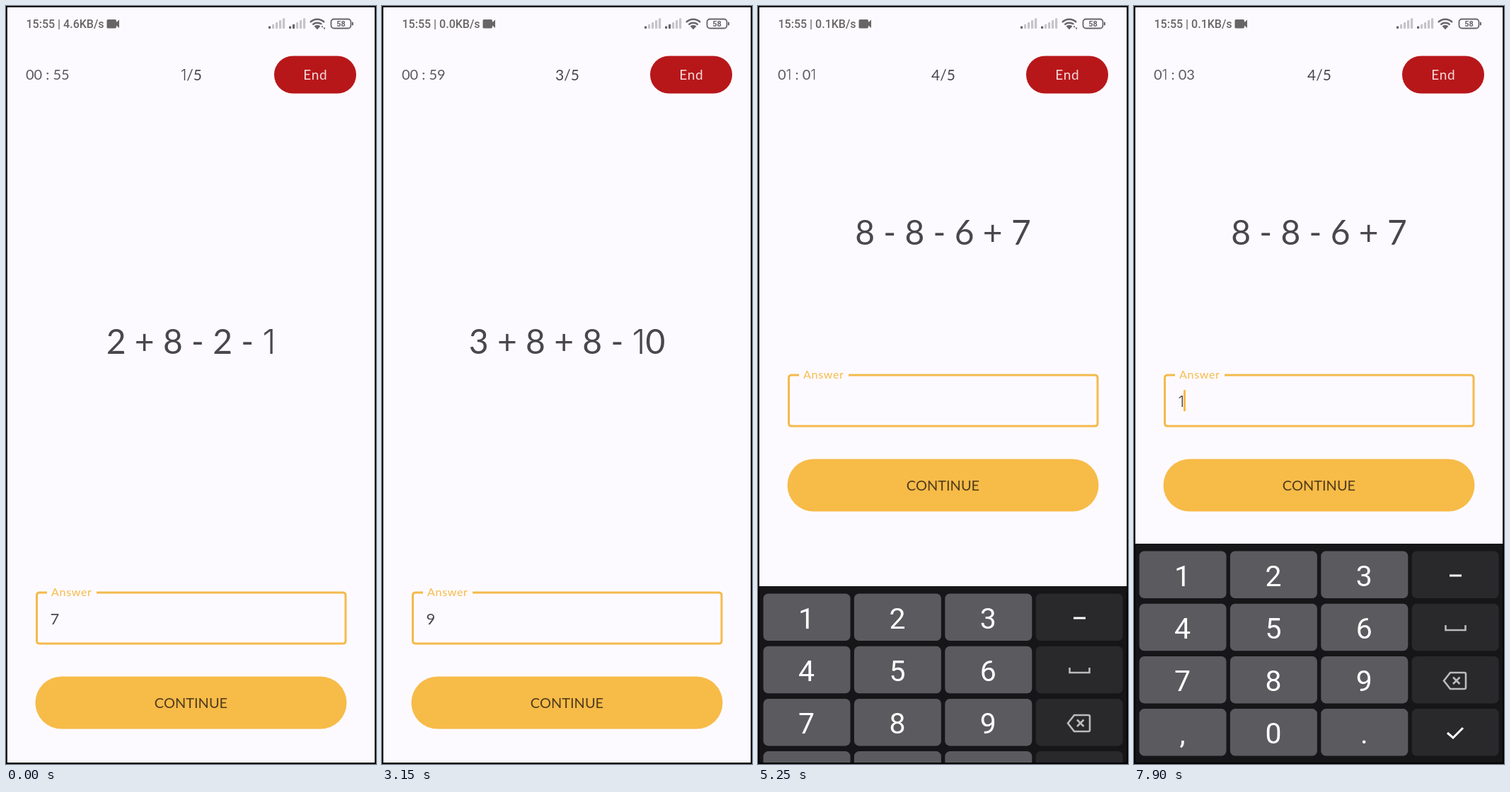
Animation, 523 px wide and 1070 px high, one loop 8 s. Source, as an HTML page:

```html
<!DOCTYPE html>
<html lang="en">
<head>
<meta charset="utf-8">
<title>Arithmetic quiz</title>
<style>
html, body { margin: 0; width: 100%; height: 100%; overflow: hidden; background: #fdfaff; }
svg { display: block; width: 523px; height: 1070px; font: 20px Lato, "Open Sans", sans-serif; fill: #48474c; }
.one { font-family: Inter, sans-serif; font-weight: 300; }
.mid { text-anchor: middle; }
.status { font: 500 16px Roboto, sans-serif; fill: #666; }
.key { font: 41px Roboto, sans-serif; fill: #fff; text-anchor: middle; }
.line { fill: none; stroke: #66656a; stroke-width: 2.4; }
.gold { fill: #f7bb48; }
</style>
</head>
<body>
<svg viewBox="0 0 523 1070">
  <rect width="523" height="1070" fill="#fdfaff"/>

  <text class="status" id="status" x="28.5" y="31"></text>
  <path d="M144 19h10q2 0 2 2v2l4-3.500v11.500l-4-3.500v2q0 2-2 2h-10q-1.500 0-1.500-1.500v-9q0-2 1.500-2z" fill="#666"/>
  <g id="bars"></g>
  <path class="line" d="M430 23a14 14 0 0 1 20 0M433.500 26.500a9 9 0 0 1 13 0"/>
  <path d="M435.500 28.500q4.500-3.500 9 0l-4.500 4.800z" fill="#66656a"/>
  <path id="arrows" d="M444.500 26h7v8h-7z" fill="#fdfaff"/>
  <path id="arrowTips" d="M445.500 30l1.500-2.500 1.500 2.500zM448.500 30.500h3l-1.500 3z" fill="#66656a"/>
  <rect class="line" x="459.500" y="18.500" width="28" height="13" rx="4" style="stroke-width:1.800"/>
  <rect x="489" y="22.500" width="2" height="5" rx="1" fill="#66656a"/>
  <text class="mid" x="473.500" y="29" style="font:700 11px Roboto,sans-serif" fill="#66656a">58</text>

  <text id="timer" x="28" y="104" fill="#5a595e"></text>
  <text id="counter" class="mid" x="262" y="104.500" font-size="21"></text>
  <rect x="379" y="70.500" width="116" height="53" rx="26.500" fill="#b8171a"/>
  <text class="mid" x="437.300" y="103.500" font-size="19" letter-spacing=".7" fill="#f6dcdc">End</text>

  <g id="pages" class="mid" font-size="48"></g>

  <g id="form">
    <path d="M58 828H47.500q-4 0-4 4V896q0 4 4 4H476q4 0 4-4V832q0-4-4-4H128" fill="none" stroke="#f4ba4c" stroke-width="3"/>
    <text class="gold" x="64" y="833" font-size="16" letter-spacing=".7">Answer</text>
    <text id="answer" x="62.500" y="873" font-size="22"></text>
    <rect id="cursor" class="gold" y="849" width="3" height="30"/>
    <rect class="gold" x="41.500" y="946.500" width="440" height="74" rx="37"/>
    <text class="mid" x="261.500" y="991" fill="#4f3c1b">CONTINUE</text>
  </g>

  <g id="keyboard"><rect y="759" width="523" height="311" fill="#161518"/></g>
  <path d="M.8 .8H522.200V1069H.8z" fill="none" stroke="#000" stroke-width="2"/>
</svg>
<script>
const $ = id => document.getElementById(id);
const LOOP = 8000, PAGE = 520, SLIDE = 500;
const questions = ['2 + 8 - 2 - 1', '2 - 10 + 10 - 8', '3 + 8 + 8 - 10', '8 - 8 - 6 + 7'];
const answers = ['7', '-6', '9', ''];
const slides = [500, 2177, 3820];
const ticks = [100, 1150, 2150, 3050, 4100, 5150, 6050, 7150];
// Times at which the caret turns on, off, on, ...
const blinks = [1000, 1500, 2000, 3100, 3650, 4800, 5350, 5850, 6350, 6800, 7300];

const passed = (times, t) => times.filter(x => t >= x).length;
const set = (id, attr, value) => $(id).setAttribute(attr, value);
const show = (id, on) => set(id, 'visibility', on ? 'visible' : 'hidden');
const footless = s => s.replace(/1/g, '<tspan class="one">1</tspan>');
const write = (id, s) => { if ($(id).textContent !== s) $(id).innerHTML = footless(s); };

// Cubic bezier (.25, .1, .25, 1)
function ease(x) {
  if (x <= 0) return 0;
  if (x >= 1) return 1;
  let lo = 0, hi = 1, u;
  for (let i = 0; i < 20; i++) {
    u = (lo + hi) / 2;
    if (.75 * u * (1 - u) + u ** 3 < x) lo = u; else hi = u;
  }
  return .3 * u * (1 - u) ** 2 + 3 * u * u * (1 - u) + u ** 3;
}

function drawBars(darkSecond) {
  let s = '';
  [371, 400].forEach((x, group) => {
    for (let i = 0; i < 5; i++) {
      const h = 3.5 + i * 2.8, dark = i < (group ? darkSecond : 1);
      s += `<rect x="${x + i * 5}" y="${32 - h}" width="3.2" height="${h}" rx="1" fill="${dark ? '#66656a' : '#c6c4c9'}"/>`;
    }
  });
  $('bars').innerHTML = s;
}

function buildKeyboard() {
  const labels = ['1', '2', '3', '', '4', '5', '6', '', '7', '8', '9', '', ',', '0', '.', ''];
  let s = '';
  labels.forEach((label, i) => {
    const col = i % 4, x = 7.5 + col * 128.4, y = 769.5 + (i >> 2) * 74.2;
    s += `<rect id="key${i}" x="${x}" y="${y}" width="123" height="66.5" rx="7" fill="${col < 3 ? '#5b5a5e' : '#29282b'}"/>`;
    s += `<text class="key" x="${x + 61}" y="${y + 49}">${label}</text>`;
  });
  s += `<g fill="none" stroke="#fff" stroke-width="3"><path d="M446 804h17"/><path d="M443 1026l8 7 14-14"/>
    <g stroke="#bbbabd" stroke-width="2.600"><path d="M440.500 874v7h28v-7"/>
    <path d="M447 941h20q2 0 2 2v19q0 2-2 2h-20l-9-11.500zM451 947.500l9.500 9.500M460.500 947.500l-9.500 9.500"/></g></g>`;
  $('keyboard').innerHTML += s;
}

function draw(t) {
  const page = slides.reduce((p, s) => p + ease((t - s) / SLIDE), 0);
  const seconds = 55 + passed(ticks, t);
  const two = n => String(n).padStart(2, '0');
  write('timer', two(Math.floor(seconds / 60)) + ' : ' + two(seconds % 60));
  write('counter', Math.round(page) + 1 + '/5');
  $('status').textContent = `15:55 | ${t < 100 ? '4.6' : t < 4100 ? '0.0' : '0.1'}KB/s`;
  drawBars(t < 4100 ? 2 : 1);
  const traffic = t < 1150 || t >= 4100 && t < 7150;
  show('arrows', traffic);
  show('arrowTips', traffic);

  const raised = t >= 5200;
  set('pages', 'transform', `translate(${-PAGE * page} ${raised ? -153.5 : 0})`);
  set('form', 'transform', `translate(0 ${raised ? -307 : 0})`);

  const typed = t >= 7800;
  write('answer', typed ? '1' : answers[passed(slides.map(s => s + SLIDE), t)]);
  const blinkOn = passed(blinks, t) % 2 && !(t >= 5000 && t < 5350);
  show('cursor', blinkOn);
  set('cursor', 'x', typed ? 70 : 62.8);

  const left = Math.max(0, (5350 - t) / 200);
  set('keyboard', 'transform', `translate(0 ${Math.min(320, 240 * left * left)})`);
  show('keyboard', t >= 5150);
  set('key0', 'fill', t >= 7750 && t < 7900 ? '#747377' : '#5b5a5e');
}

$('pages').innerHTML = questions.map((q, i) =>
  `<text x="${261.5 + PAGE * i}" y="490.5">${footless(q)}</text>`).join('');
buildKeyboard();

const start = performance.now();
function frame() {
  const t = (performance.now() - start) % LOOP;
  draw(Math.floor(t / 50) * 50);
  requestAnimationFrame(frame);
}
frame();
</script>
</body>
</html>
```
